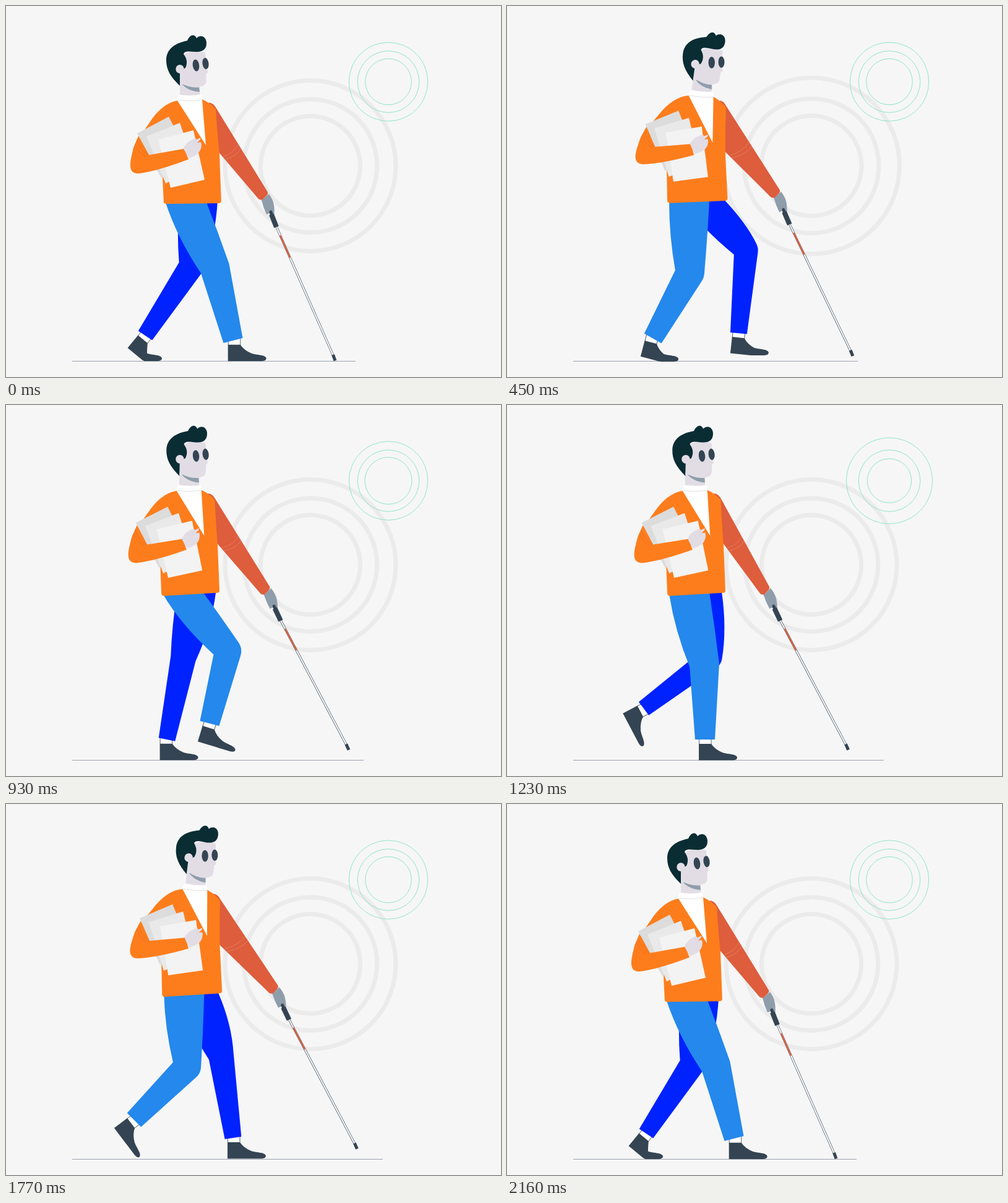
Write an HTML page with a canvas that moves like this. It is 800x600 px and loops after 2190 ms.

```html
<!DOCTYPE html>
<html>
<head>
<meta charset="utf-8">
<title>Walking with a cane</title>
<style>
html, body { margin: 0; width: 100%; height: 100%; overflow: hidden; background: #f6f6f6; }
canvas { display: block; }
</style>
</head>
<body>
<canvas id="stage" width="800" height="600"></canvas>
<script>
const ctx = document.getElementById('stage').getContext('2d');
const LOOP = 2190, STRIDE = 1080, FRAME = 30, FLOOR = 541;
const ORANGE = '#fd7d1c', RUST = '#dd5d3c', SLATE = '#344453', SKIN = '#e2dde5', STEEL = '#8f9dab', HAIR = '#0a2c33';

// Each step is a closed ankle path: [time, x, y]
const nearLeg = {
  color: '#2488ec', thigh: 118, shin: 120, kneeHalf: 24, hemHalf: 16, bulge: 1,
  step: [[0, 367, 541], [150, 320, 541], [240, 293, 541], [500, 225, 535], [690, 207, 511], [800, 253, 488], [930, 329, 515]]
};
const farLeg = {
  color: '#0022ff', thigh: 108, shin: 133, kneeHalf: 20.5, hemHalf: 13.5, bulge: 9,
  step: [[0, 225, 533], [150, 221, 491], [240, 266, 484], [390, 353, 520], [570, 397, 541], [690, 367, 540], [930, 260, 541]]
};

const clamp = v => Math.max(0, Math.min(1, v));
const mix = (a, b, u) => [a[0] + (b[0] - a[0]) * u, a[1] + (b[1] - a[1]) * u];
const frameAt = (x, y, turn, ox, oy) => new DOMMatrix().translate(x, y).rotate(turn).translate(-ox, -oy);
const mapper = m => (x, y) => {
  const p = m.transformPoint({ x, y });
  return [p.x, p.y];
};
const reset = () => ctx.setTransform(1, 0, 0, 1, 0, 0);

// Smooth closed curve through timed points
function along(path, t) {
  const n = path.length;
  const key = i => {
    const [at, x, y] = path[(i + n) % n];
    return [at + Math.floor(i / n) * STRIDE, x, y];
  };
  let i = n - 1;
  while (path[i][0] > t) i--;
  const [p, a, b, q] = [key(i - 1), key(i), key(i + 1), key(i + 2)];
  const h = b[0] - a[0], u = (t - a[0]) / h;
  return [1, 2].map(j => {
    const ma = (b[j] - p[j]) / (b[0] - p[0]) * h;
    const mb = (q[j] - a[j]) / (q[0] - a[0]) * h;
    const d = b[j] - a[j];
    return a[j] + u * (ma + u * (3 * d - 2 * ma - mb + u * (ma + mb - 2 * d)));
  });
}

// The whole upper body sways once and bobs twice per stride
function bodyAt(t) {
  const w = 2 * Math.PI * t / STRIDE;
  const lean = 1 - Math.cos(w), bob = 1 - Math.cos(2 * w), snap = 1 - Math.cos(4 * w);
  const dx = 5.2 * Math.sin(w) + .8 * lean;
  const dy = -10.2 * bob - snap;
  const turn = 3 * lean;
  return {
    torso: frameAt(300 + dx, 280 + dy, turn, 300, 280),
    nod: turn * .4,
    left: [255 + dx, 320 + .85 * dy + .8 * turn],
    right: [348 + dx + .8 * turn, 319 + 1.15 * dy + .6 * turn],
    cane: frameAt(437 + 10.5 * lean - 1.5 * Math.sin(w) + 1.8 * bob, 358 + .62 * dy, .29 * dy, 437, 358),
    floorEnd: 565 + 16 * bob + 15.5 * Math.sin(2 * w) + 5 * snap
  };
}

function fill(color, d) {
  ctx.fillStyle = color;
  ctx.fill(new Path2D(d));
}
function line(color, width, d) {
  ctx.strokeStyle = color;
  ctx.lineWidth = width;
  ctx.stroke(new Path2D(d));
}
function ring(color, width, x, y, r) {
  ctx.strokeStyle = color;
  ctx.lineWidth = width;
  ctx.beginPath();
  ctx.arc(x, y, r, 0, 7);
  ctx.stroke();
}
function oval(x, y, rx, ry, turn, color) {
  ctx.fillStyle = color;
  ctx.beginPath();
  ctx.ellipse(x, y, rx, ry, turn, 0, 7);
  ctx.fill();
}

function pulse(t, start, length, size) {
  const u = clamp((t - start) / length);
  return size * Math.sin(2 * Math.PI * u);
}

function drawRings(t) {
  for (const [r, start, size] of [[80.5, 140, 4], [107.7, 170, 3], [138, 240, 5]])
    ring('#ebebeb', 7, 492, 258.5, r + pulse(t, start, 640, size));
  for (const [r, start, size] of [[37.3, 910, 3], [49.8, 960, 5], [63.7, 1070, 6]])
    ring('#8ee6c6', 1, 618, 122.5, r + pulse(t, start, 540, size));
}

function drawFoot(x, y, turn, bend) {
  ctx.setTransform(frameAt(x, y, turn, 10, 0));
  fill('#fff', 'M.5-16H20V1H.5Z');
  line(SLATE, .8, 'M.5-16V1M20-16V1');
  const toe = mapper(frameAt(33, 25, -bend, 33, 25));
  ctx.fillStyle = SLATE;
  ctx.beginPath();
  ctx.moveTo(0, 0);
  ctx.lineTo(20, 0);
  ctx.quadraticCurveTo(26, 9, ...toe(38, 14));
  ctx.bezierCurveTo(...toe(46, 17), ...toe(61, 16), ...toe(62, 22));
  ctx.quadraticCurveTo(...toe(62, 26), ...toe(55, 26.5));
  ctx.lineTo(...toe(34, 26.5));
  ctx.lineTo(31, 26.5);
  ctx.lineTo(0, 26.5);
  ctx.fill();
  reset();
}

// Two-bone leg: the knee follows from hip and ankle
function drawLeg(leg, t, hipBack, hipFront) {
  const { thigh, shin, kneeHalf, hemHalf, bulge } = leg;
  const hip = mix(hipBack, hipFront, .5);
  const [ax, y] = along(leg.step, t), ay = Math.min(y, FLOOR);
  const dist = Math.hypot(ax - hip[0], ay - hip[1]);
  const ux = (ax - hip[0]) / dist, uy = (ay - hip[1]) / dist;
  const reach = Math.min(dist, thigh + shin);
  const down = (thigh ** 2 - shin ** 2 + reach ** 2) / (2 * reach);
  const out = Math.sqrt(Math.max(0, thigh ** 2 - down ** 2));
  const kx = hip[0] + ux * down + uy * out, ky = hip[1] + uy * down - ux * out;

  const len = Math.hypot(ax - kx, ay - ky);
  const sx = (ax - kx) / len, sy = (ay - ky) / len;
  const lift = FLOOR - ay;
  const turn = 1.17 * Math.max(0, Math.atan2(-sx, sy)) * 180 / Math.PI * clamp(lift / 8);
  drawFoot(ax + 7 * sx, ay + 7 * sy, turn, turn * clamp((26 - lift) / 14));

  const back = [kx - uy * kneeHalf, ky + ux * kneeHalf];
  const front = [kx + uy * kneeHalf, ky - ux * kneeHalf];
  const [bx, by] = mix(hipBack, back, .5), [fx, fy] = mix(hipFront, front, .5);
  ctx.fillStyle = leg.color;
  ctx.beginPath();
  ctx.moveTo(...hipBack);
  ctx.quadraticCurveTo(bx - 4 - (back[0] - hipBack[0]) * .1, by, ...back);
  ctx.lineTo(ax - sy * hemHalf, ay + sx * hemHalf);
  ctx.lineTo(ax + sy * hemHalf, ay - sx * hemHalf);
  ctx.arcTo(...front, fx + bulge, fy, 24);
  ctx.quadraticCurveTo(fx + bulge, fy, ...hipFront);
  ctx.fill();
}

function drawCane(m) {
  ctx.setTransform(m);
  line('#566270', 3.6, 'M437 357L530 568');
  line('#fff', 2, 'M437 357L530 568');
  line(RUST, 2.4, 'M443 371L459 407');
  line(SLATE, 5, 'M528.5 564L532 573.5');
  line(SLATE, 3, 'M415 313L423 332');
  fill(STEEL, 'M413 314L425 304Q432 314 433 322Q435 336 432 341Q428 344 426 335L421 337Q416 326 413 314Z');
  line(SLATE, 8, 'M429 337L437 357.5');
  oval(428.5, 335, 2.6, 4.5, -.3, SLATE);
  reset();
}

function drawCaneArm(P, C) {
  const shoulder = P(339, 164), armpit = P(346, 239), cuff = C(423, 301), wrist = C(411, 314);
  ctx.fillStyle = RUST;
  ctx.beginPath();
  ctx.moveTo(...P(328, 156));
  ctx.quadraticCurveTo(...P(335, 157), ...shoulder);
  ctx.lineTo(...cuff);
  ctx.quadraticCurveTo(...C(424, 304), ...C(421, 307));
  ctx.lineTo(...C(414, 313.5));
  ctx.quadraticCurveTo(...wrist, ...C(408, 312));
  ctx.lineTo(...armpit);
  ctx.lineTo(...P(328, 220));
  ctx.fill();
  ctx.strokeStyle = '#e88569';
  ctx.lineWidth = .8;
  for (const d of [0, .05]) {
    const outer = mix(shoulder, cuff, .43 + d), inner = mix(armpit, wrist, .07 + d);
    const [x, y] = mix(outer, inner, .4);
    ctx.beginPath();
    ctx.moveTo(...outer);
    ctx.quadraticCurveTo(x + 4, y + 6, ...inner);
    ctx.stroke();
  }
}

function drawHead(m) {
  ctx.setTransform(m);
  fill(SKIN, 'M281 98H314L313 146H281Z');
  fill(SKIN, 'M284 80Q304 68 322 75L324 101L326.500 107L323.500 110V122Q323 128 316 130Q298 133 283 125Z');
  fill(STEEL, 'M283 125Q297 133 312 131.500L313 139Q294 138 283 125Z');
  fill(HAIR, 'M281 129C266 115 259 103 259 88C259 72 269 61 293 56C297 47 304 44 308 52C315 45 324 50 324 60C324 71 317 75 304 74C294 73 288 73 287 78C292 84 294 92 290 100L283 104Z');
  oval(281, 102, 6.7, 7, 0, SKIN);
  fill(SKIN, 'M281 108H288V127H281Z');
  oval(307, 96, 5.2, 9.5, -.14, SLATE);
  oval(322.5, 93, 5, 9.2, -.14, SLATE);
}

function drawSweater(P, left, right) {
  ctx.fillStyle = ORANGE;
  ctx.beginPath();
  ctx.moveTo(...P(277, 153));
  ctx.bezierCurveTo(...P(260, 156), ...P(245, 168), ...P(231, 190));
  ctx.quadraticCurveTo(...P(215, 212), ...P(206, 232));
  ctx.lineTo(...P(225, 260));
  ctx.lineTo(...P(252.5, 268));
  ctx.arcTo(...left, ...right, 4);
  ctx.arcTo(...right, ...P(345, 240), 4);
  ctx.lineTo(...P(345, 240));
  ctx.quadraticCurveTo(...P(341, 200), ...P(339, 167));
  ctx.quadraticCurveTo(...P(331, 157), ...P(317, 151));
  ctx.lineTo(...P(323, 225));
  ctx.fill();
}

function drawPapersAndArm() {
  fill('#dcdcdc', 'M212 206L263 179L300 250L251 278Z');
  fill('#e9e9e9', 'M227 211L281 189L306 262L258 287Z');
  fill('#f3f3f3', 'M246 216L303 201L321 281L266 294Z');
  fill(SKIN, 'M286 232Q291 220 301 216Q306 212 308 216L314 213Q316 215 309 221L315 220Q318 230 310 239Q304 243 296 246Z');
  line('#cfc9d3', .7, 'M303 221L308 217M306 224L310 221');
  fill(ORANGE, 'M206 229L214 210L231 241L287 231Q292 239 295 248Q245 267 214 271C200 271 199 260 203 242Z');
  line('#ef6a25', .8, 'M209 223Q213 237 226 243M212 219Q216 233 230 241');
}

function draw(t) {
  const s = t % STRIDE;
  const { torso, nod, left, right, cane, floorEnd } = bodyAt(s);
  const [x, y] = left;
  const P = mapper(torso), C = mapper(cane);

  reset();
  ctx.fillStyle = '#f6f6f6';
  ctx.fillRect(0, 0, 800, 600);
  drawRings(t);
  line('#9ca2b0', 1, `M107 574.5H${floorEnd}`);

  drawLeg(farLeg, s, [x + 25, y - 4], [right[0] - 6, y - 6]);
  drawLeg(nearLeg, s, [x + 3, y - 2], [x + 68, y - 5]);
  drawCane(cane);
  drawCaneArm(P, C);
  drawHead(torso.multiply(frameAt(297, 142, nod, 297, 142)));

  ctx.setTransform(torso);
  fill('#fff', 'M279 143.500Q298 146 316 143L317 152L323 226L276 154Z');
  line('#d9d9de', .8, 'M278 152.500Q298 155 317 151.500');
  reset();
  drawSweater(P, left, right);
  ctx.setTransform(torso);
  drawPapersAndArm();
}

const begin = performance.now();
function tick() {
  const t = (performance.now() - begin) % LOOP;
  draw(Math.floor(t / FRAME) * FRAME);
  requestAnimationFrame(tick);
}
tick();
</script>
</body>
</html>
```
